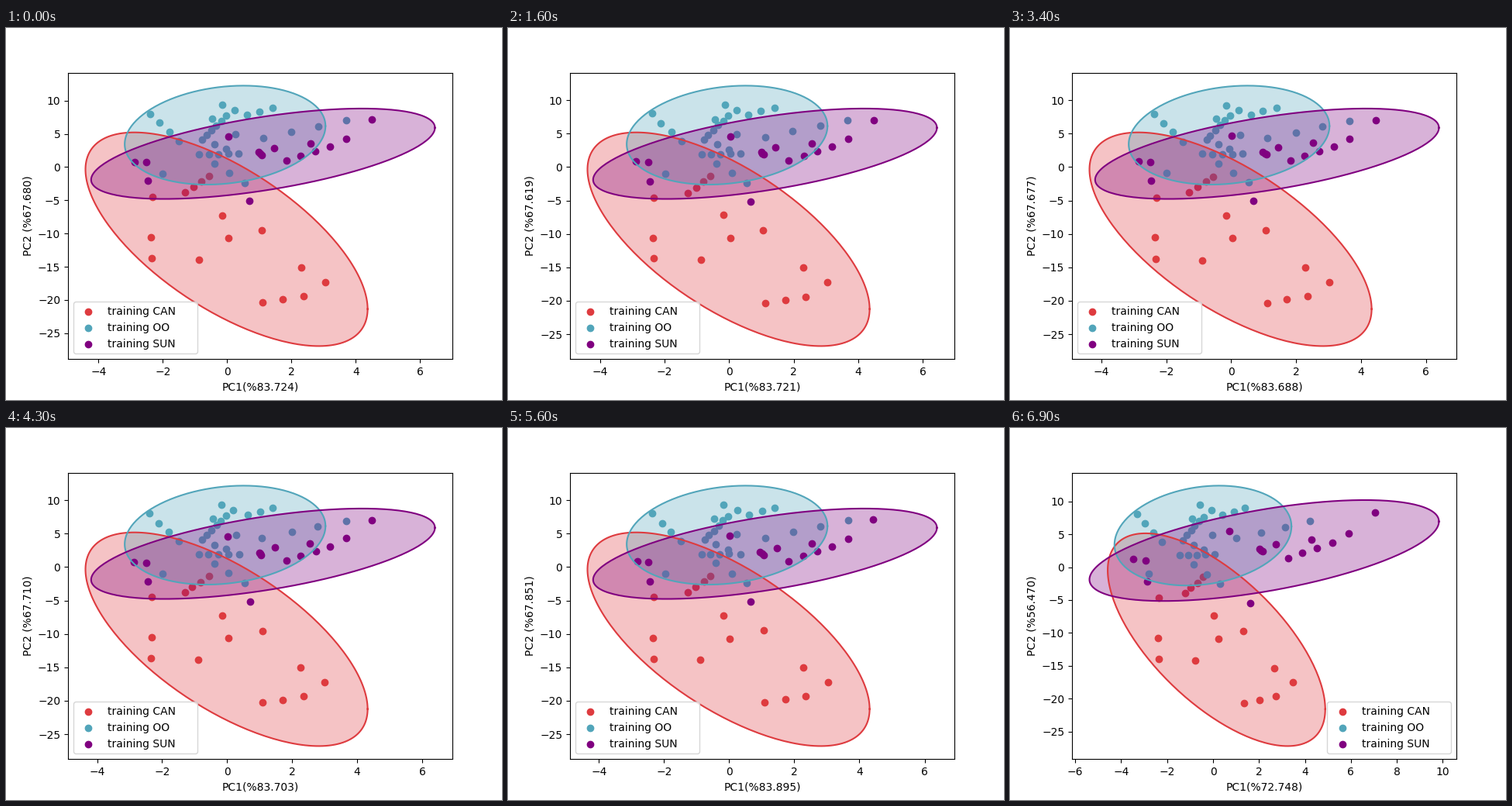
Write a matplotlib script that moves like this. It is 640 by 480 pixels and loops after 7 s.

```python
import numpy as np
import matplotlib.pyplot as plt
from matplotlib.animation import FuncAnimation

FRAMES = 70
INTERVAL = 100
TURN = 61  # step at which the clusters start to spread

# Explained variance, in percent, at a few steps before the spread
PC_STEPS = [0, 16, 34, 43, 56, TURN]
PC1 = [83.724, 83.721, 83.688, 83.703, 83.895, 83.786]
PC2 = [67.680, 67.619, 67.677, 67.710, 67.851, 67.794]
PC1_END, PC2_END = 72.748, 56.470


def route(*knots):
    """Points along a line of (steps since the last knot, x, y)."""
    steps, x, y = np.array(knots).T
    at = np.cumsum(steps)
    i = np.arange(at[-1] + 1)
    return np.column_stack([np.interp(i, at, x), np.interp(i, at, y)])


def ellipse(center, radii, corr):
    """Outline of a confidence ellipse with the given correlation."""
    t = np.linspace(0, 2 * np.pi, 200)
    unit = np.column_stack([np.cos(t), np.cos(t - np.arccos(corr))])
    return center + unit * radii


# Each cluster ends at its start times scale, plus shift.
# Trailing spaces widen the legend box.
CLUSTERS = [
    dict(label="training CAN     ", color="#de3b3f",
         outline=ellipse((-0.02, -10.86), (4.385, 16.07), -0.653),
         points=route((0, -0.57, -1.4), (3, -1.3, -3.85), (1, -2.33, -4.55),
                      (1, -2.37, -10.6), (1, -2.35, -13.75), (1, -0.88, -14),
                      (1, 0.04, -10.7), (1, -0.16, -7.25), (1, 1.07, -9.55),
                      (1, 2.3, -15.15), (1, 3.05, -17.35), (1, 2.37, -19.45),
                      (2, 1.1, -20.4)),
         scale=(1.08, 1.006), shift=(0.17, -0.1)),
    dict(label="training OO", color="#52a5ba",
         outline=ellipse((-0.065, 4.8), (3.12, 7.44), 0.183),
         points=route((0, -2.4, 8), (3, -1.5, 3.9), (1, -2, -0.95),
                      (1, 0.54, -2.35), (3, -0.88, 1.9), (4, 0.35, 2),
                      (3, -0.78, 4.1), (5, -0.04, 7.7), (1, -0.47, 7.25),
                      (1, -0.16, 9.35), (2, 0.61, 7.85), (2, 1.41, 8.9),
                      (1, 0.25, 4.9), (1, 1.12, 4.4), (3, 3.7, 7)),
         scale=(1.235, 1.02), shift=(-0.36, -0.1)),
    dict(label="training SUN", color="purple",
         outline=ellipse((1.114, 2), (5.343, 6.8), 0.575),
         points=route((0, 4.49, 7.1), (1, 3.7, 4.3), (2, 1.46, 2.9),
                      (1, 3.19, 3.05), (3, 1.84, 0.95), (1, 1.07, 1.85),
                      (2, 0.98, 2.25), (1, 0.04, 4.65), (1, -2.52, 0.7),
                      (1, -2.88, 0.8), (1, -2.47, -2.1), (1, 0.69, -5.1)),
         scale=(1.424, 1.128), shift=(0.64, 0.27)),
]


def lerp(start, end, amount):
    return start + amount * (end - start)


def draw(step):
    rng = np.random.default_rng(step)
    jitter = (0.015, 0.04) if step else (0, 0)
    late = np.clip((step - TURN) / (FRAMES - 1 - TURN), 0, 1)
    spread = np.sin(late * np.pi / 2)
    shrink = np.array([1 - 0.012 * min(step / 50, 1),
                       1 - 0.006 * min(step / 10, 1)])

    def place(xy, cluster):
        end = xy * cluster["scale"] + cluster["shift"]
        return lerp(xy * shrink, end, spread)

    ax.clear()
    for cluster in CLUSTERS:
        color = cluster["color"]
        points = place(cluster["points"], cluster)
        points = points + rng.normal(0, jitter, points.shape)
        x, y = place(cluster["outline"], cluster).T
        ax.scatter(*points.T, color=color, label=cluster["label"])
        ax.plot(x, y, color=color)
        ax.fill(x, y, color=color, alpha=0.3, linewidth=0)

    pc1 = lerp(np.interp(step, PC_STEPS, PC1), PC1_END, spread)
    pc2 = lerp(np.interp(step, PC_STEPS, PC2), PC2_END, spread)
    ax.set_xlabel(f"PC1(%{pc1:.3f})")
    ax.set_ylabel(f"PC2 (%{pc2:.3f})")
    ax.legend(loc="lower right" if spread > 0.4 else "lower left")
    return []


fig, ax = plt.subplots(figsize=(6.4, 4.8), dpi=100)
anim = FuncAnimation(fig, draw, frames=FRAMES, interval=INTERVAL,
                     repeat=True, repeat_delay=0)
plt.show()
```
